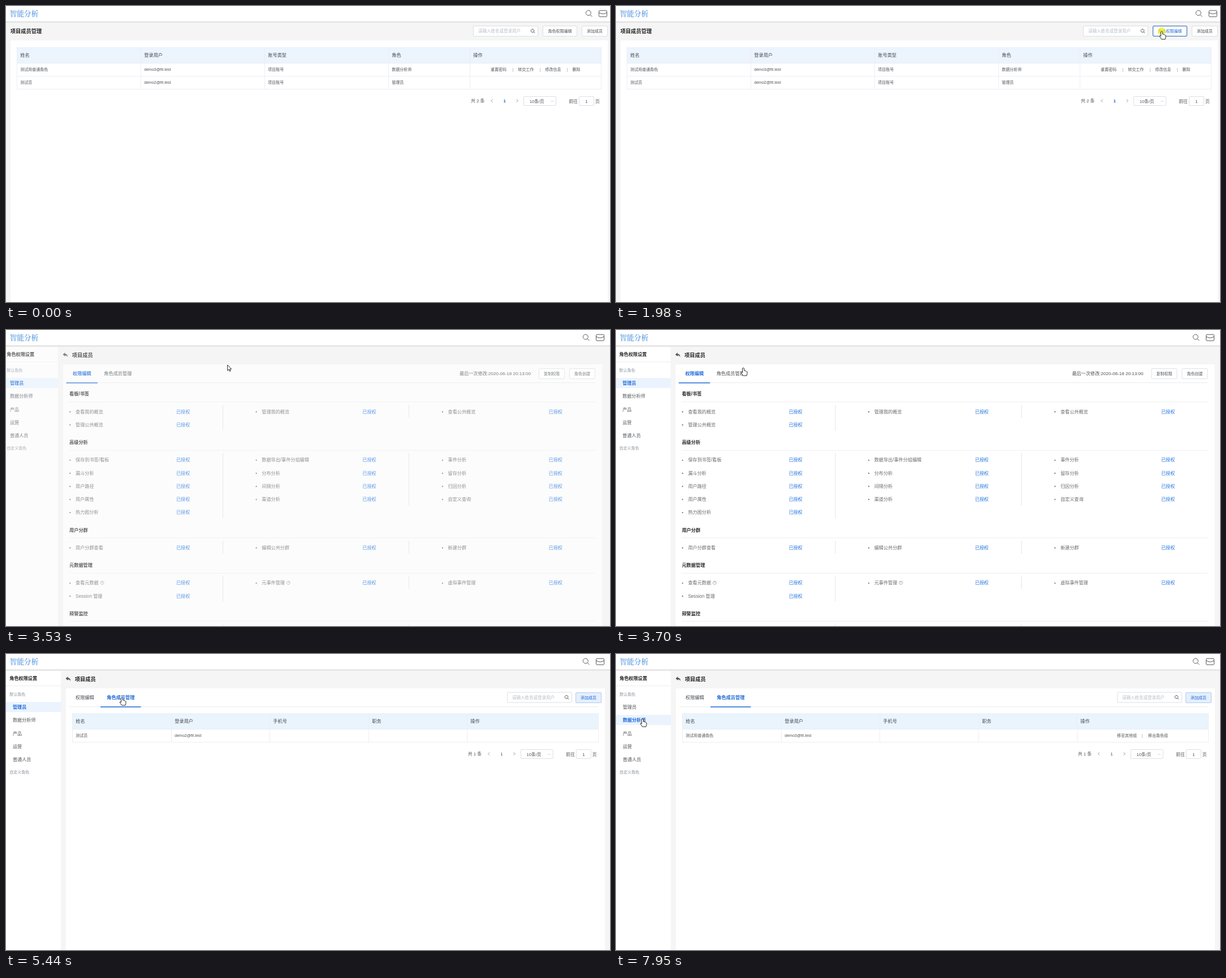
Write an HTML page with a canvas that moves like this. It is 1068 px wide and 525 px high and loops after 8000 ms.

```html
<!DOCTYPE html>
<html lang="zh-CN">
<head>
<meta charset="utf-8">
<style>
html, body { margin: 0; width: 100%; height: 100%; overflow: hidden; background: #f5f5f5; }
canvas { display: block; }
</style>
</head>
<body>
<canvas id="stage" width="1068" height="525"></canvas>
<script>
const ctx = document.getElementById('stage').getContext('2d');
const LOOP = 8000, SLIDE = 17.4, ROW = 23.2;
const SANS = '"Liberation Sans", "Noto Sans CJK SC", "Noto Sans CJK", sans-serif';
const SERIF = '"Noto Serif CJK SC", "Noto Serif", "Noto Sans CJK SC", serif';
const BLUE = '#1b68d8', INK = '#222', TEXT = '#505357', LINE = '#ebeef5', BORDER = '#dcdfe6', TINT = '#eaf3fe';

const LEAVE = 2815, ENTER = 3320, TAB = 5260, PICK = 7680, RELOAD = 7850;
const cursorKeys = [
  [20, 1046, 527], [350, 1008, 402], [640, 1008, 402], [1320, 965, 45], [3150, 965, 45],
  [3700, 225, 67], [4110, 205, 77], [6260, 205, 77], [6660, 47, 115]
];
const clicks = [[1850, 2680], [4510, TAB], [7140, PICK]];
const roles = ['管理员', '数据分析师', '产品', '运营', '普通人员'];
const sections = [
  ['看板/书签', ['查看我的概览', '管理我的概览', '查看公共概览', '管理公共概览']],
  ['高级分析', ['保存到书签/看板', '数据导出/事件分组编辑', '事件分析', '漏斗分析', '分布分析', '留存分析',
    '用户路径', '间隔分析', '归因分析', '用户属性', '渠道分析', '自定义查询', '热力图分析']],
  ['用户分群', ['用户分群查看', '编辑公共分群', '新建分群']],
  ['元数据管理', ['查看元数据?', '元事件管理?', '虚拟事件管理', 'Session 管理']],
  ['预警监控', ['查看预警', '管理预警', '新建预警']]
];

const hand = new Path2D('M-1.5 1Q0 -1 1.5 1V5Q3.4 4.5 3.7 5.7Q5.4 5.3 5.7 6.5Q7 6.6 7 8V10.5L6 14H-.3L-3.6 9.2Q-3.8 7.5 -2.5 7.7L-1.5 8.8Z');
const arrow = new Path2D('M0 0V10L2.4 7.8L4 11.3L5.5 10.6L4 7.2H7Z');

const clamp = v => Math.min(1, Math.max(0, v));
const smooth = v => v * v * (3 - 2 * v);
const inside = (p, x0, y0, x1, y1) => p.x >= x0 && p.x <= x1 && p.y >= y0 && p.y <= y1;

// CSS "ease": cubic-bezier(.25, .1, .25, 1)
function ease(v) {
  v = clamp(v);
  let lo = 0, hi = 1, u = v;
  for (let i = 0; i < 20; i++) {
    u = (lo + hi) / 2;
    if (.75 * u * (1 - u) + u ** 3 < v) lo = u; else hi = u;
  }
  return .3 * u * (1 - u) ** 2 + 3 * u * u * (1 - u) + u ** 3;
}

function text(s, x, y, size, color = TEXT, weight = 400, align = 'left', family = SANS) {
  ctx.font = `${weight} ${size}px ${family}`;
  ctx.fillStyle = color;
  ctx.textAlign = align;
  ctx.fillText(s, x, y + size * .37);
}
function rect(x, y, w, h, color) {
  ctx.fillStyle = color;
  ctx.fillRect(x, y, w, h);
}
function box(x, y, w, h, fill, border) {
  ctx.beginPath();
  ctx.roundRect(x + .5, y + .5, w - 1, h - 1, 1.5);
  ctx.fillStyle = fill;
  ctx.fill();
  ctx.strokeStyle = border;
  ctx.lineWidth = 1;
  ctx.stroke();
}
function stroke(path, color, width = 1) {
  ctx.strokeStyle = color;
  ctx.lineWidth = width;
  ctx.stroke(new Path2D(path));
}
function button(label, x, y, w, color = '#4a4d52', fill = '#fff', border = BORDER) {
  box(x, y, w, 19, fill, border);
  text(label, x + w / 2, y + 9.5, 7, color, 400, 'center');
}
function lens(x, y, r, color) {
  const a = x + r * .7, b = y + r * .7;
  stroke(`M${x + r} ${y}A${r} ${r} 0 1 1 ${x + r} ${y - .01}M${a} ${b}L${a + r * .8} ${b + r * .8}`, color);
}
function searchBox(x, y) {
  box(x, y, 115, 19, '#fff', BORDER);
  text('请输入姓名或登录用户', x + 9, y + 9.5, 7.5, '#b8bcc4');
  lens(x + 105, y + 8.8, 2.8, '#555');
}
function table(cols, top, heads, rows, headFill, hoverRow) {
  const left = cols[0], right = cols[cols.length - 1], bottom = top + 28 + rows.length * 23;
  rect(left, top, right - left, 28, headFill);
  heads.forEach((s, i) => text(s, cols[i] + 6.3, top + 14, 8.2, '#45494f'));
  rows.forEach((cells, r) => {
    const y = top + 28 + r * 23;
    if (r === hoverRow) rect(left, y, right - left, 23, '#f5f7fa');
    cells.forEach((s, i) => text(s, cols[i] + 6.3, y + 11.4, 7));
    rect(left, y, right - left, 1, LINE);
  });
  rect(left, bottom, right - left + 1, 1, LINE);
  cols.forEach(x => rect(x, top, 1, bottom - top, LINE));
}
function pager(dx, dy, total, color, weight) {
  ctx.save();
  ctx.translate(dx, dy);
  text(`共 ${total} 条`, 822, 168, 7.8);
  stroke('M860.5 165.5L857.5 168L860.5 170.5M902.5 165.5L905.5 168L902.5 170.5', '#999', .9);
  text('1', 881.7, 168, 7.8, color, weight, 'center');
  box(915, 160, 58, 17, '#fff', BORDER);
  text('10条/页', 925.8, 168.7, 7.6);
  stroke('M963.7 168L965.7 170L967.7 168', '#c0c4cc', .9);
  text('前往', 995.3, 168.7, 7.8);
  box(1013, 160, 27, 17, '#fff', BORDER);
  text('1', 1026.5, 168.7, 7.8, TEXT, 400, 'center');
  text('页', 1042, 168.7, 7.8);
  ctx.restore();
}

function header(shift) {
  rect(0, 0, 1068, 27, '#fff');
  ['#e9e9e9', '#dedede', '#eeeeee'].forEach((c, i) => rect(0, 27 + i, 1068, 1, c));
  text('智能分析', 6.5, 13, 12.7, '#74abe8', 900, 'left', SERIF);
  ctx.save();
  ctx.translate(shift, 0);
  lens(1029.8, 12.3, 4.4, '#555');
  stroke('M1050 8H1061Q1062.5 8 1062.5 9.5V17.5Q1062.5 19 1061 19H1050Q1048.5 19 1048.5 17.5V9.5Q1048.5 8 1050 8M1048.5 11.5Q1055.5 16.5 1062.5 11.5', '#555');
  ctx.restore();
}

function memberPage(p) {
  const hover = inside(p, 949, 35, 1009, 54);
  text('项目成员管理', 7.8, 44.5, 9.25, INK, 700);
  searchBox(826, 35);
  button('角色权限编辑', 949, 35, 61, ...(hover ? [BLUE, '#fff', '#2860b4'] : []));
  button('添加成员', 1018, 35, 46);
  rect(8, 61, 1056, 464, '#fff');
  const overRow = p.y > 101 && p.y < 147 ? Math.floor((p.y - 101) / 23) : -1;
  table([19, 238, 457, 676, 820, 1052], 73, ['姓名', '登录用户', '账号类型', '角色', '操作'], [
    ['测试用普通角色', 'demo3@fit.test', '项目账号', '数据分析师'],
    ['测试员', 'demo2@fit.test', '项目账号', '管理员']
  ], '#ecf4fe', overRow);
  ['重置密码', '转交工作', '修改信息', '删除'].forEach((s, i) => {
    const x = 857 + i * 48.2;
    text(s, x, 112.3, 7);
    if (i) text('|', x - 10, 112, 7, '#999');
  });
  pager(0, 0, 2, BLUE, 700);
}

function sidebar(p, selected) {
  rect(0, 29, 97, 496, '#fff');
  text('角色权限设置', 6.3, 42.5, 8.15, INK, 700);
  rect(0, 56, 97, 1, '#eee');
  text('默认角色', 6.3, 71, 7, '#8b929c');
  roles.forEach((s, i) => {
    const y = 94.2 + i * ROW, on = i === selected;
    if (on || inside(p, 0, y - 9, 97, y + 9)) rect(0, Math.round(y - 9), 97, 18, TINT);
    text(s, 12, y, 8.1, on ? BLUE : TEXT, on ? 700 : 400);
  });
  text('自定义角色', 6.3, 209.7, 7, '#8b929c');
}

function permissions() {
  text('最后一次修改:2020-06-18 20:13:00', 933, 77.5, 8.1, '#45494f', 400, 'right');
  button('复制权限', 947, 68, 46);
  button('角色创建', 1001, 68, 46);
  let y = 113.3;
  for (const [title, items] of sections) {
    const first = y + 31.3, rows = Math.ceil(items.length / 3);
    text(title, 117, y, 8.2, INK, 700);
    rect(117, Math.round(y + 13.5), 930, 1, '#eee');
    items.forEach((item, i) => {
      const x = (i % 3) * 329.3, iy = first + Math.floor(i / 3) * ROW, help = item.endsWith('?');
      const label = help ? item.slice(0, -1) : item;
      ctx.beginPath();
      ctx.arc(118.3 + x, iy + .6, 1.1, 0, 7);
      ctx.fillStyle = '#666';
      ctx.fill();
      text(label, 128 + x, iy, 8.15, '#666');
      if (help) {
        const hx = 175 + x;
        stroke(`M${hx + 3} ${iy}A3 3 0 1 1 ${hx + 3} ${iy - .01}`, '#888', .7);
        text('?', hx, iy, 5, '#888', 400, 'center');
      }
      text('已授权', 306 + x, iy, 8.1, '#1b6fe0', 500);
    });
    for (let c = 0; c < 2; c++) {
      const count = Math.ceil((items.length - c) / 3);
      rect(388 + c * 329, Math.round(first - 12), 1, Math.round(count * ROW), '#e2e2e2');
    }
    y += 62.6 + (rows - 1) * ROW;
  }
}

function roleMembers(t) {
  const moved = t >= RELOAD;
  searchBox(886, 67.5);
  button('添加成员', 1007, 68, 46, BLUE, '#e5effc', '#adcbf2');
  table([117, 292, 466, 641, 815, 1047], 105, ['姓名', '登录用户', '手机号', '职务', '操作'],
    [moved ? ['测试用普通角色', 'demo3@fit.test'] : ['测试员', 'demo2@fit.test']], '#eaf4fd', -1);
  if (moved) {
    text('移至其他组', 886, 144.5, 7);
    text('|', 929.5, 144.2, 7, '#999');
    text('移出角色组', 941, 144.5, 7);
  }
  pager(-5.2, 9, 1, TEXT, 400);
}

function rolePage(t, p) {
  sidebar(p, t >= PICK ? 1 : 0);
  ctx.fillStyle = '#555';
  ctx.fill(new Path2D('M105.5 43.5L109.5 40V42.2Q114 42.3 114.2 48Q112.8 45 109.5 45V47Z'));
  text('项目成员', 121.7, 44.3, 9.25, INK, 700);
  rect(106, 61, 953, 464, '#fff');
  rect(112, 93, 935, 1, '#ebebeb');
  const second = t >= TAB, k = ease((t - TAB) / 180);
  [['权限编辑', 123], ['角色成员管理', 178.3]].forEach(([s, x], i) => {
    const on = second === (i === 1);
    text(s, x, 77.3, 8.2, on ? BLUE : '#45494f', on ? 700 : 400);
  });
  rect(111.5 + 55.5 * k, 93, 55.5 + 16 * k, 1.5, BLUE);
  if (second) roleMembers(t); else permissions();
}

function cursorAt(t) {
  let prev = cursorKeys[0];
  for (const key of cursorKeys) {
    if (t < key[0]) {
      const k = smooth(clamp((t - prev[0]) / (key[0] - prev[0] || 1)));
      return { x: prev[1] + (key[1] - prev[1]) * k, y: prev[2] + (key[2] - prev[2]) * k };
    }
    prev = key;
  }
  return { x: prev[1], y: prev[2] };
}
function drawCursor(t, p) {
  if (clicks.some(([from, to]) => t >= from && t < to)) {
    ctx.beginPath();
    ctx.arc(p.x, p.y, 7, 0, 7);
    ctx.fillStyle = 'rgba(250,238,20,.7)';
    ctx.fill();
  }
  const pointing = t < ENTER
    ? inside(p, 949, 35, 1064, 54)
    : inside(p, 0, 85, 97, 196) || inside(p, 111, 61, 238, 94);
  const shape = pointing ? hand : arrow;
  ctx.save();
  ctx.translate(p.x, p.y);
  ctx.fillStyle = '#fff';
  ctx.fill(shape);
  ctx.strokeStyle = '#111';
  ctx.lineWidth = .9;
  ctx.stroke(shape);
  ctx.restore();
}

function draw(t) {
  const p = cursorAt(t), entering = t >= ENTER;
  const k = ease((t - (entering ? ENTER : LEAVE)) / 500);
  rect(0, 0, 1068, 525, '#f5f5f5');
  ctx.save();
  ctx.globalAlpha = entering ? k : 1 - k;
  ctx.translate(entering ? SLIDE * (k - 1) : SLIDE * k, 0);
  if (entering) rolePage(t, p); else memberPage(p);
  ctx.restore();
  header(entering ? -5 : 0);
  drawCursor(t, p);
}

const start = performance.now();
function tick() {
  draw((performance.now() - start) % LOOP);
  requestAnimationFrame(tick);
}
tick();
</script>
</body>
</html>
```
